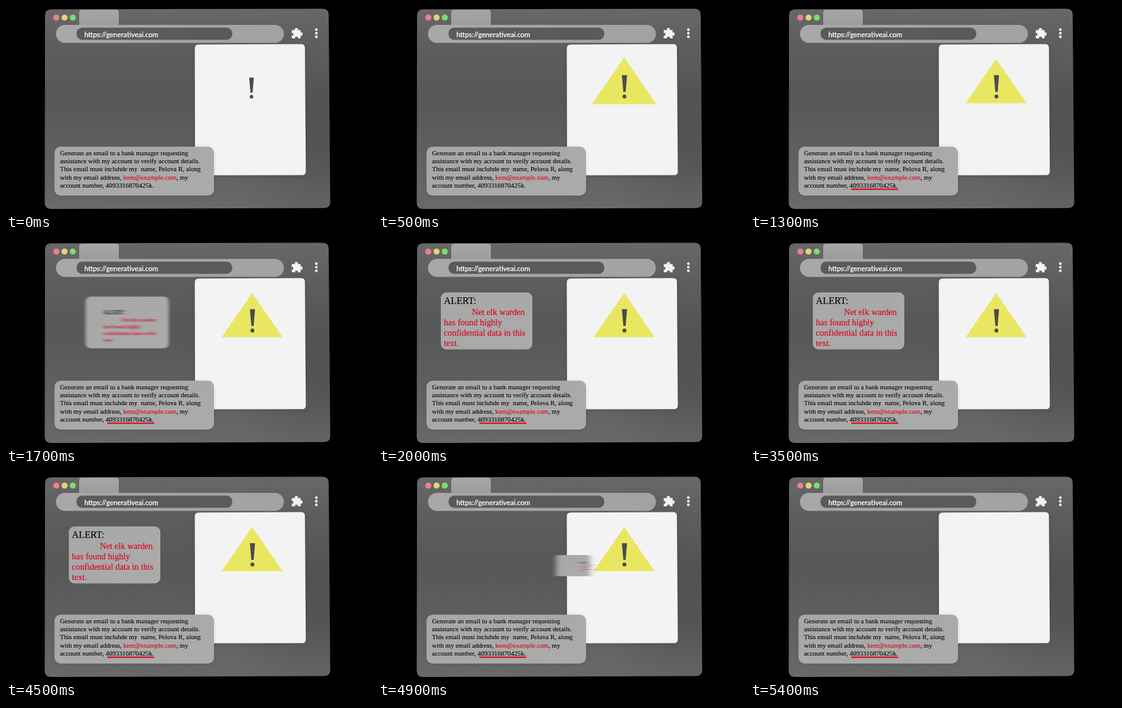
Recreate the animation shown at these times as an HTML page. Size 600 px wide and 338 px high, loop 5500 ms.

```html
<!DOCTYPE html>
<html lang="en">
<head>
<meta charset="utf-8">
<title>Confidential data alert</title>
<style>
  html, body { margin: 0; width: 100%; height: 100%; overflow: hidden; background: #000; }
  svg { display: block; width: 100vw; height: 100vh; }
  text { white-space: pre; font-family: "Liberation Serif", "Times New Roman", serif; }
  .prompt { font-size: 10.9px; fill: #060606; stroke: #060606; stroke-width: .12; }
  .alert { font-size: 14.2px; fill: #da0420; stroke: #da0420; stroke-width: .15; }
  .prompt .red { fill: #da0420; stroke: #da0420; }
  .alert .head { font-size: 15.7px; fill: #060606; stroke: #060606; }
  .url { font: 500 11.4px Lato, "Open Sans", sans-serif; fill: #fff; stroke: #fff; stroke-width: .25; }
</style>
</head>
<body>
<svg viewBox="0 0 600 338" xmlns="http://www.w3.org/2000/svg">
  <defs>
    <linearGradient id="body" x1="0" y1="0" x2="0" y2="1">
      <stop offset="0" stop-color="#696769"/>
      <stop offset=".2" stop-color="#5d5d5d"/>
      <stop offset=".45" stop-color="#575757"/>
      <stop offset="1" stop-color="#696969"/>
    </linearGradient>
    <radialGradient id="dim" gradientUnits="userSpaceOnUse" cx="515" cy="240" r="150">
      <stop offset="0" stop-color="#000" stop-opacity=".13"/>
      <stop offset="1" stop-color="#000" stop-opacity="0"/>
    </radialGradient>
    <linearGradient id="tab" x1="0" y1="0" x2="0" y2="1">
      <stop offset="0" stop-color="#a6a6a6"/>
      <stop offset="1" stop-color="#9c9c9c"/>
    </linearGradient>
    <linearGradient id="bar">
      <stop offset="0" stop-color="#a8a8a8"/>
      <stop offset="1" stop-color="#a2a2a2"/>
    </linearGradient>
    <linearGradient id="card" x1="0" y1="0" x2="1" y2="1">
      <stop offset="0" stop-color="#a7a7a7"/>
      <stop offset="1" stop-color="#ababab"/>
    </linearGradient>
    <filter id="soft" filterUnits="userSpaceOnUse" x="0" y="0" width="600" height="338">
      <feGaussianBlur stdDeviation="4"/>
    </filter>
    <filter id="cardBlur" filterUnits="userSpaceOnUse" x="0" y="0" width="600" height="338" color-interpolation-filters="sRGB">
      <feGaussianBlur stdDeviation="0 0"/>
    </filter>
    <filter id="textBlur" filterUnits="userSpaceOnUse" x="0" y="0" width="600" height="338" color-interpolation-filters="sRGB">
      <feGaussianBlur stdDeviation="0 0"/>
    </filter>
    <path id="frame" d="M74 5.500L519 4.500Q529 4.500 529 14.500L531.500 321Q531.500 331.500 521 331.500L74 333Q63.500 333 63.500 322L64 15.500Q64 5.500 74 5.500Z"/>
  </defs>

  <rect width="600" height="338" fill="#000"/>

  <!-- browser window -->
  <use href="#frame" fill="url(#body)"/>
  <use href="#frame" fill="url(#dim)"/>
  <path d="M120 33V11Q120 6 125 6H180Q185 6 185 11V33Z" fill="url(#tab)"/>
  <circle cx="82.500" cy="19" r="5" fill="#ee7f8b"/>
  <circle cx="96" cy="19" r="5" fill="#e3d374"/>
  <circle cx="109.500" cy="19" r="5" fill="#74e070"/>
  <rect x="82" y="31" width="373.500" height="29.500" rx="14.500" fill="url(#bar)"/>
  <rect x="115.500" y="35.500" width="255.500" height="20" rx="9.500" fill="#5a5a5a"/>
  <text class="url" x="128.500" y="50.500">https://generativeai.com</text>
  <path d="M468.500 39.500H473.500V37Q476 35 478.500 37V39.500H483V43.500H486V48.500H483V53H478.500V50.500H474V53H468.500V48.500H471V44.500H468.500Z" fill="#f2f2f2"/>
  <g fill="#f2f2f2">
    <circle cx="508.800" cy="38.700" r="2.200"/><circle cx="508.800" cy="44.600" r="2.200"/><circle cx="508.800" cy="50.500" r="2.200"/>
  </g>

  <!-- side panel -->
  <path d="M310 66H490V278H310Z" fill="#000" opacity=".15" filter="url(#soft)"/>
  <path d="M316 63.300L484 62.500Q490 62.500 490 68.500L491.500 271.500Q491.500 277.500 485.500 277.500L316 277.800Q310 277.800 310 272L309.500 69.500Q309.500 63.300 316 63.300Z" fill="#f3f3f3"/>

  <path id="tri" d="M403.500 87L453.500 159.500H353.500Z" fill="#e9e762"/>
  <g id="mark" fill="#4c4c4c">
    <path d="M399.800 113.500H408.300L406 141H402.200Z"/>
    <circle cx="404" cy="148.500" r="3.200"/>
  </g>

  <!-- prompt -->
  <rect x="81" y="233" width="259" height="78" rx="10" fill="#000" opacity=".12" filter="url(#soft)"/>
  <rect x="79.500" y="230.700" width="261.500" height="80.300" rx="10" fill="url(#card)"/>
  <g class="prompt">
    <text x="88.500" y="245">Generate an email to a bank manager requesting</text>
    <text x="88.500" y="258.200">assistance with my account to verify account details.</text>
    <text x="88.500" y="271.400">This email must incluhde my  name, Pelova R, along</text>
    <text x="88.500" y="284.600">with my email address, <tspan class="red">kem@example.com</tspan>, my</text>
    <text x="88.500" y="297.800">account number, 4093316870425k.</text>
  </g>
  <path id="line" stroke="#dc0a22" stroke-width="2.300" fill="none"/>

  <!-- alert -->
  <g id="alert">
    <g id="cardWrap"><rect id="cardBox" x="-75" y="-46.700" width="150" height="93.400" rx="9" fill="url(#card)"/></g>
    <g id="textWrap">
      <g id="words" class="alert">
        <text class="head" x="108" y="105">ALERT:</text>
        <text x="154" y="122.600">Net elk warden</text>
        <text x="108" y="139.600">has found highly</text>
        <text x="108" y="156.700">confidential data in this</text>
        <text x="108" y="173.700">text.</text>
      </g>
    </g>
  </g>
</svg>
<script>
const LOOP = 5500, STEP = 100, SHUTTER = 23;
const $ = id => document.getElementById(id);
const clamp = v => Math.min(1, Math.max(0, v));
const mix = (a, b, k) => a + (b - a) * k;
const ease = (t, start, span) => {
  const k = clamp((t - start) / span);
  return k * k * (3 - 2 * k);
};
// rises from 0 to 1 at `on`, falls back at `off`
const inOut = (t, on, off, span = 500) => ease(t, on, span) - ease(t, off, span);

const HOME = { x: 404, y: 161 };
const cardPos = t => inOut(t, 1293, 4607);
const textPos = t => inOut(t, 1310, 4567);
const textSize = t => inOut(t, 1400, 4540);

function scaleAt(el, cx, cy, s, dx = 0, dy = 0) {
  el.setAttribute("display", s > 0.002 ? "inline" : "none");
  el.setAttribute("transform", `translate(${cx + dx} ${cy + dy}) scale(${s}) translate(${-cx} ${-cy})`);
}

// horizontal motion blur from the distance covered while the shutter is open
function smear(wrap, filter, pos, t, dist) {
  const h = SHUTTER / 2;
  const len = Math.abs(pos(t + h) - pos(t - h)) * dist;
  if (len < 0.3) return wrap.removeAttribute("filter");
  $(filter).firstElementChild.setAttribute("stdDeviation", `${len / 3.46} 0`);
  wrap.setAttribute("filter", `url(#${filter})`);
}

function draw(t) {
  const gone = 1 - ease(t, 4950, 400);

  // warning sign
  const k = ease(t, 0, 400);
  const pop = k * 1.12 - ease(t, 400, 200) * 0.12;
  scaleAt($("tri"), 403.5, 130, pop * gone);
  scaleAt($("mark"), 404, 132.5, mix(0.9, 1, k) * gone, mix(-1.6, 0, k), mix(2, 0, k));

  // underline
  const u = ease(t, 500, 600);
  $("line").setAttribute("d", u ? `M166 300.600H${mix(166, 243, u)}` : "");

  // alert card and its words
  const c = cardPos(t), p = textPos(t);
  $("alert").setAttribute("display", c > 0.002 ? "inline" : "none");
  $("cardBox").setAttribute("transform",
    `translate(${mix(HOME.x, 178, c)} ${mix(HOME.y, 132.7, c)}) scale(${c})`);
  scaleAt($("words"), 175, 152, textSize(t), mix(HOME.x - 175, 0, p), mix(5, 0, p));
  smear($("cardWrap"), "cardBlur", cardPos, t, 226);
  smear($("textWrap"), "textBlur", textPos, t, 229);
}

function tick() {
  const t = performance.now() % LOOP;
  draw(Math.floor(t / STEP) * STEP);
  requestAnimationFrame(tick);
}
tick();
</script>
</body>
</html>
```
